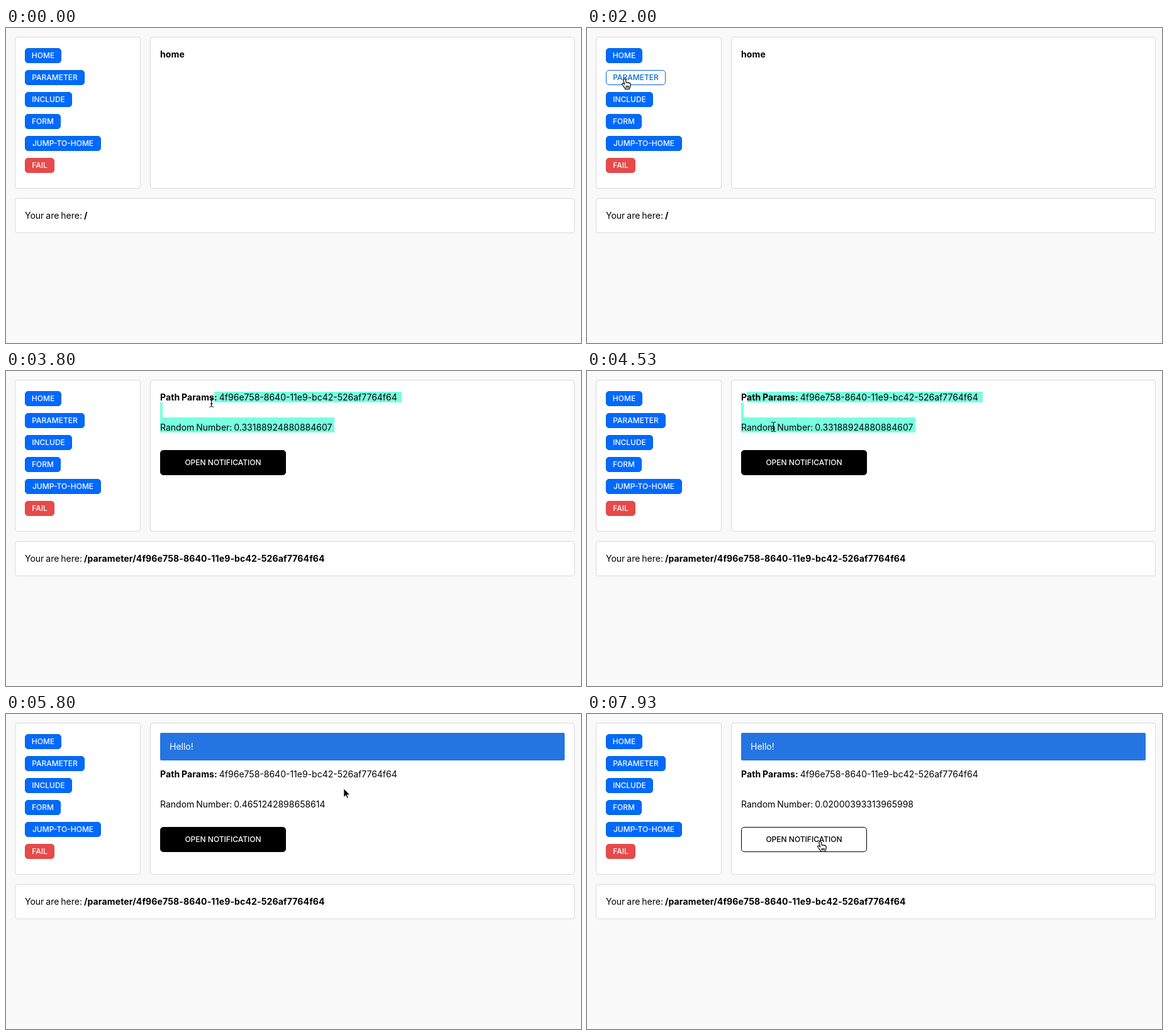
Write an HTML page that moves like this. It is 914 px wide and 502 px high and loops after 8000 ms.

```html
<!DOCTYPE html>
<html lang="en">
<head>
<meta charset="utf-8">
<title>Router demo</title>
<style>
  html, body { margin: 0; width: 100%; height: 100%; overflow: hidden; background: #f9f9f9; }
  body { position: relative; font: 14px/24px Inter, sans-serif; word-spacing: -1px; color: #000; white-space: pre; }
  body * { box-sizing: border-box; }
  b { letter-spacing: .14px; }
  .card, .btn, .line, .sel, .note, .cur { position: absolute; }
  .card { left: 14px; top: 14px; height: 242px; background: #fff; border: 1px solid #d9d9d9; border-radius: 4px; }
  .btn {
    --m: 0; --c: #0069ff; --edge: #0366d6;
    left: 30px; height: 24px; border-radius: 5px; border: 1px solid var(--edge);
    font-size: 12px; font-weight: 500; line-height: 22px; text-align: center; word-spacing: 0;
    background: color-mix(in srgb, #fff calc(var(--m) * 100%), var(--c));
    color: color-mix(in srgb, var(--edge) calc(var(--m) * 100%), #fff);
  }
  .red { --c: #e64a4a; --edge: #e04848; }
  .open { --c: #000; --edge: #000; left: 245px; width: 200px; height: 40px; line-height: 38px; }
  .line { left: 245px; height: 24px; }
  .sel { background: #7affdf; }
  .note {
    left: 245px; top: 30px; width: 643px; height: 44px; padding-left: 15px;
    line-height: 44px; border-radius: 2px; background: #2475e1; color: #fff;
  }
  .cur { left: 0; top: 0; width: 24px; height: 24px; overflow: visible; }
</style>
</head>
<body>
<div class="card" id="menu" style="width:200px"></div>
<div class="card" style="left:229px;width:675px"></div>
<div class="card" style="top:271px;width:890px;height:56px"></div>

<div class="sel"></div><div class="sel"></div><div class="sel"></div>
<div class="note" id="note">Hello!</div>
<b class="line" id="home" style="top:30px">home</b>
<div class="line" id="params"><b>Path Params:</b> <span id="uuid"></span></div>
<div class="line" id="random"></div>
<div class="btn open" id="open">OPEN NOTIFICATION</div>
<div class="line" style="left:30px;top:287px">Your are here: <b id="path">/</b></div>

<svg class="cur" id="arrow"><path d="M.5 .5v14.2l3.3-3.1 2 4.8 2.2-.9-2-4.7h4.6z" stroke="#fff"/></svg>
<svg class="cur" id="hand"><g transform="translate(-4.5 -1)" stroke="#000" stroke-width="1.2" stroke-linejoin="round" stroke-linecap="round">
  <path fill="#fff" d="M4.3 1.1c-1 .3-1.3 1.1-1 2.1l1.9 6.6c-.8-.9-2-1.7-3-1.6-1.1.2-1.4 1-.8 1.8 1.2 1.5 2 2.5 3 4.1.7 1.1 1.6 1.7 1.8 3.2h6.6c.1-1.4.9-2 1.4-3.4.5-1.5.7-3.4.4-5-.3-1.2-1.4-1.5-2-.8-.2-1.1-1.6-1.4-2.2-.5-.3-1-1.9-1.2-2.4-.2L6.7 2.2C6.4 1.3 5.4.8 4.3 1.1z"/>
  <path fill="none" d="M7.7 12v3M9.7 12v3M11.7 12v3"/>
</g></svg>
<svg class="cur" id="beam"><path fill="none" stroke="#000" d="M-3.5-7.5h1.5q2 0 2 2v11q0 2-2 2h-1.5M3.5-7.5h-1.5q-2 0-2 2v11q0 2 2 2h1.5M-2 2.5h4"/></svg>

<script>
const LOOP = 8000, STEP = 1000 / 15, FADE = 280;
const VISIT = 2130, NOTIFY = 5130, AGAIN = 7670;
const DRAG1 = [3300, 4270], DRAG2 = [6200, 6740];
const UUID = '4f96e758-8640-11e9-bc42-526af7764f64';
const el = id => document.getElementById(id);
const show = (node, on) => { node.style.visibility = on ? 'visible' : 'hidden'; };
const ease = k => k * k * (3 - 2 * k);
const within = (t, [from, to]) => t >= from && t < to;

const menu = { HOME: 58, PARAMETER: 95, INCLUDE: 75, FORM: 57, 'JUMP-TO-HOME': 121, FAIL: 47 };
const btns = Object.entries(menu).map(([label, width], i) => {
  const b = document.createElement('div');
  b.className = label === 'FAIL' ? 'btn red' : 'btn';
  b.textContent = label;
  b.style.cssText = `top:${32 + 35 * i}px;width:${width}px`;
  el('menu').after(b);
  return b;
});
btns.push(el('open'));

// where the pointer rests or turns: time, x, y
const stops = [
  [67, 198, 2], [870, 80, 165], [1530, 59, 81], [2000, 59, 81], [2500, 105, 113],
  [2640, 300, 118], [2667, 318, 142], [2930, 425, 168], [3300, 546, 94], [3733, 330, 50],
  [4270, 251, 42], [4870, 362, 157], [5200, 362, 157], [6200, 631, 97], [6740, 335, 90],
  [7130, 333, 90], [7600, 370, 203], [LOOP, 370, 203]
];

function pointer(t) {
  if (t < 60) return [-50, -50];
  const i = Math.max(1, stops.findIndex(s => s[0] >= t));
  const [t0, x0, y0] = stops[i - 1], [t1, x1, y1] = stops[i];
  const k = ease(Math.max(0, (t - t0) / (t1 - t0)));
  return [x0 + (x1 - x0) * k, y0 + (y1 - y0) * k];
}

const shift = t => t >= NOTIFY ? 54 : 0;
const openTop = t => 126 + shift(t);
const boxes = btns.map(b => [b.offsetLeft, b.offsetTop, b.offsetWidth, b.offsetHeight]);

function over(i, t) {
  const isOpen = btns[i] === el('open');
  if (isOpen && t < VISIT) return false;
  const [x, y] = pointer(t), [left, top, w, h] = boxes[i];
  const dy = y - (isOpen ? openTop(t) : top);
  return x >= left && x < left + w && dy >= 0 && dy < h;
}

// share of the last FADE ms spent hovering, eased
function hoverMix(i, t) {
  const n = 28;
  let sum = 0;
  for (let k = 0; k < n; k++) sum += over(i, t - k * FADE / n);
  return ease(sum / n);
}

// x of every character boundary along a line
const pen = document.createElement('canvas').getContext('2d');
function edges(...runs) {
  let x = 245;
  const out = [x];
  for (const [text, weight] of runs) {
    pen.font = weight + ' 14px Inter, sans-serif';
    pen.wordSpacing = '-1px';
    pen.letterSpacing = weight === 700 ? '.14px' : '0px';
    for (let n = 1; n <= text.length; n++) out.push(x + pen.measureText(text.slice(0, n)).width);
    x = out.at(-1);
  }
  return out;
}
const nearest = (list, x) => list.reduce((a, b) => Math.abs(b - x) < Math.abs(a - x) ? b : a);

const numbers = ['0.33188924880884607', '0.4651242898658614', '0.02000393313965998'];
const first = edges(['Path Params:', 700], [' ' + UUID, 400]);
const third = edges(['Random Number: ' + numbers[0], 400]);
const sels = document.querySelectorAll('.sel');

// selected rectangles: left, top, right, bottom
function selection(t) {
  const dragged = drag => pointer(Math.min(t - STEP, drag[1]));
  if (within(t, [DRAG1[0] + STEP, NOTIFY])) {
    const [x, y] = dragged(DRAG1);
    if (y > 78) return [[nearest(third, x), 82, 522, 98]];
    const rest = [[245, 50, 249, 74], [245, 74, 522, 98]];
    return y > 54 ? rest : [[nearest(first, x), 33, 629, 50], ...rest];
  }
  if (within(t, [DRAG2[0] + STEP, 7400])) {
    return [[nearest(first, dragged(DRAG2)[0]), 87, 625, 104]];
  }
  return [];
}

function cursorKind(t) {
  if (btns.some((b, i) => over(i, t))) return 'hand';
  const [x, y] = pointer(t), dy = y - shift(t);
  const onText = t >= VISIT && x >= 245 && x < 626 &&
    (Math.abs(dy - 42) < 12 || Math.abs(dy - 90) < 12 && x < 522);
  return onText || within(t, DRAG1) || within(t, DRAG2) ? 'beam' : 'arrow';
}

function draw(t) {
  const visited = t >= VISIT;
  show(el('home'), !visited);
  for (const id of ['params', 'random', 'open']) show(el(id), visited);
  show(el('note'), t >= NOTIFY);
  el('path').textContent = visited ? '/parameter/' + UUID : '/';
  el('random').textContent = 'Random Number: ' + numbers[(t >= NOTIFY) + (t >= AGAIN)];
  el('params').style.top = 30 + shift(t) + 'px';
  el('random').style.top = 78 + shift(t) + 'px';
  el('open').style.top = openTop(t) + 'px';
  btns.forEach((b, i) => b.style.setProperty('--m', hoverMix(i, t).toFixed(3)));

  const rects = selection(t);
  sels.forEach((node, i) => {
    show(node, rects[i]);
    if (!rects[i]) return;
    const [l, top, r, bottom] = rects[i];
    Object.assign(node.style, { left: l + 'px', top: top + 'px', width: r - l + 'px', height: bottom - top + 'px' });
  });

  const kind = cursorKind(t), [x, y] = pointer(t);
  for (const id of ['arrow', 'hand', 'beam']) {
    show(el(id), id === kind);
    el(id).style.transform = `translate(${x}px, ${y}px)`;
  }
}

el('uuid').textContent = UUID;
const start = performance.now();
function tick() {
  const t = (performance.now() - start) % LOOP;
  draw(Math.floor((t + 4) / STEP) % 120 * STEP);
  requestAnimationFrame(tick);
}
tick();
</script>
</body>
</html>
```
